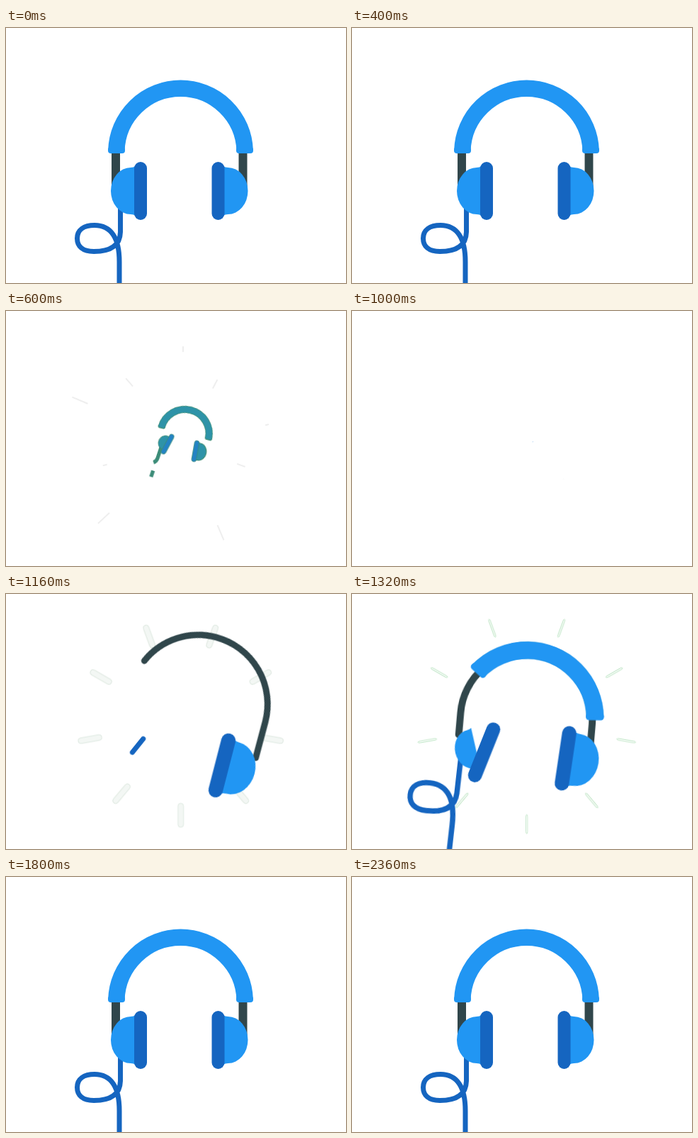
Animation of 480 by 360 pixels, one loop 2.4 s. Source, as an HTML page:

```html
<!DOCTYPE html>
<html lang="en">
<head>
<meta charset="utf-8">
<title>Headphones</title>
<style>
html, body { margin: 0; width: 100%; height: 100%; overflow: hidden; background: #fff; }
svg { display: block; width: 100vw; height: 100vh; }
svg * { animation-duration: 2.4s; animation-timing-function: linear; animation-iteration-count: infinite; }

.arch { transform-origin: 246.5px 176px; animation-name: arch; }
.right { transform-origin: 299.5px 230px; animation-name: right; }
.left { transform-origin: 190px 230px; animation-name: left; }
.left .cup { transform-origin: 180px 230px; animation-name: cup, tint; }
.wire { transform-origin: 162px 255px; animation-name: wire; }

.stem { fill: none; stroke: #30464b; stroke-width: 12; stroke-linecap: round; stroke-dasharray: 378 800; transform-origin: 246.5px 176px; animation-name: stem, sway; }
.band, .rim { fill: none; stroke: #2196f3; stroke-width: 23.5; stroke-dasharray: 180 400; }
.rim { stroke: #3c8c70; stroke-width: 22; animation-name: trim, rim; }
.band { animation-name: trim, bandTint; }
.cap { fill: #2196f3; stroke: #3c8c70; stroke-width: 0; transform-origin: 246.5px 176px; animation-name: tint, capShow; }
.cap.free { animation-name: tint, capShow, capTurn; }
.cup { fill: #2196f3; stroke: #3c8c70; stroke-width: 0; animation-name: tint; }
.pad { fill: #1565c0; stroke: #3c8c70; stroke-width: 0; animation-name: padTint; }
.cable { fill: none; stroke: #1565c0; stroke-width: 7; animation-name: cable; }
.ray { fill: #f3f7f4; stroke: #d5e2d8; stroke-width: .7; vector-effect: non-scaling-stroke; transform: scale(0); animation-name: ray; }
.spark { stroke: #8a8f8c; stroke-width: .5; opacity: 0; animation-name: spark; }

@keyframes arch {
  0%, 16.67% { transform: none; animation-timing-function: ease-in; }
  25% { transform: translate(6px, -3px) rotate(14deg) scale(.38); }
  30%, 41.6% { transform: translate(8px, 0) rotate(24deg) scale(0); }
  41.67% { transform: translate(12px, -8px) rotate(32deg) scale(.8); }
  48.33% { transform: translate(27px, -20px) rotate(15deg) scale(1.09); }
  55% { transform: translate(.5px, -.5px) rotate(1deg) scale(1.06); animation-timing-function: ease-out; }
  63.33%, 100% { transform: none; }
}
@keyframes right {
  0%, 16.67% { transform: none; animation-timing-function: ease-in; }
  25% { transform: translate(-32px, -32px) rotate(10deg) scale(.37); }
  30%, 41.67% { transform: translate(-45px, -46px) rotate(24deg) scale(0); animation-timing-function: ease-out; }
  48.33% { transform: translate(5.5px, 12px) rotate(14.5deg) scale(1.13); }
  55% { transform: translate(2px, 2px) rotate(8.5deg) scale(1.12); animation-timing-function: ease-out; }
  63.33%, 100% { transform: none; }
}
@keyframes left {
  0%, 16.67% { transform: none; animation-timing-function: ease-in; }
  25% { transform: translate(38px, -42px) rotate(28deg) scale(.38); }
  30% { transform: translate(55px, -55px) rotate(40deg) scale(0); }
  45% { transform: translate(6px, -24px) rotate(44deg) scale(0); }
  48.33% { transform: translate(-4px, -16px) rotate(39deg) scale(.38); }
  55% { transform: translate(-3.5px, -6.5px) rotate(22deg) scale(1.09); animation-timing-function: ease-out; }
  63.33%, 100% { transform: none; }
}
@keyframes cup {
  0%, 16.67% { transform: none; }
  25%, 30% { transform: scale(.8); }
  30.1%, 49.5% { transform: translate(-2px, 0) rotate(-60deg) scale(0); }
  55% { transform: translate(-4px, .5px) rotate(-35deg) scale(.77); animation-timing-function: ease-out; }
  61%, 100% { transform: none; }
}
@keyframes wire {
  0%, 16.67% { transform: none; animation-timing-function: ease-in; }
  25% { transform: translate(56px, -59px) rotate(18deg) scale(.38); }
  29%, 48.33% { transform: translate(70px, -75px) rotate(35deg) scale(0); }
  48.4% { transform: translate(-14px, -14px) rotate(16deg); }
  51.67% { transform: translate(-18px, -12px) rotate(11deg) scale(1.06); }
  55% { transform: translate(-9.5px, -9px) rotate(6.5deg) scale(1.07); animation-timing-function: ease-out; }
  63.33%, 100% { transform: none; }
}
@keyframes stem {
  0%, 16.67% { stroke-width: 12; stroke-dashoffset: 0; }
  23%, 41.6% { stroke-width: 0; stroke-dashoffset: 0; }
  41.67% { stroke-width: 0; stroke-dashoffset: 378; }
  48.33% { stroke-width: 8.2; stroke-dashoffset: 86; }
  55% { stroke-width: 9.5; stroke-dashoffset: 18; }
  60%, 100% { stroke-width: 12; stroke-dashoffset: 0; }
}
@keyframes sway {
  0%, 48.33% { transform: none; }
  55% { transform: translateX(1px) rotate(4deg) scale(.98); animation-timing-function: ease-out; }
  63.33%, 100% { transform: none; }
}
@keyframes trim {
  0%, 41.6% { stroke-dashoffset: 0; }
  41.67%, 48.7% { stroke-dashoffset: 180; }
  55% { stroke-dashoffset: 42; animation-timing-function: ease-out; }
  60%, 100% { stroke-dashoffset: 0; }
}
@keyframes capTurn {
  0%, 41.6% { transform: none; }
  41.67%, 48.7% { transform: rotate(180deg); }
  55% { transform: rotate(42deg); animation-timing-function: ease-out; }
  60%, 100% { transform: none; }
}
@keyframes capShow {
  0%, 41.6% { opacity: 1; }
  41.67%, 48.7% { opacity: 0; }
  48.8%, 100% { opacity: 1; }
}
@keyframes rim {
  0%, 18% { stroke-width: 22; }
  25%, 30% { stroke-width: 27; }
  30.1%, 100% { stroke-width: 22; }
}
@keyframes bandTint {
  0%, 18% { stroke: #2196f3; }
  25%, 30% { stroke: #2e93a8; }
  30.1%, 100% { stroke: #2196f3; }
}
@keyframes tint {
  0%, 18% { fill: #2196f3; stroke-width: 0; }
  25%, 30% { fill: #2e93a8; stroke-width: 3px; }
  30.1%, 100% { fill: #2196f3; stroke-width: 0; }
}
@keyframes padTint {
  0%, 18% { fill: #1565c0; stroke-width: 0; }
  25%, 30% { fill: #2483c4; stroke-width: 2px; }
  30.1%, 100% { fill: #1565c0; stroke-width: 0; }
}
@keyframes cable {
  0%, 18% { stroke: #1565c0; stroke-width: 7; stroke-dasharray: 100 300 0 300; }
  25%, 30% { stroke: #3c8c78; stroke-width: 14; stroke-dasharray: 24 56 8 300; }
  30.1%, 48.4% { stroke: #1565c0; stroke-width: 7; stroke-dasharray: 0 300 0 300; }
  53.5%, 100% { stroke: #1565c0; stroke-width: 7; stroke-dasharray: 100 300 0 300; }
}
@keyframes ray {
  0%, 42.5% { transform: translateY(50px) scale(0); }
  43.33% { transform: translateY(60px) scale(.8, .3); animation-timing-function: ease-out; }
  48.33% { transform: translateY(130px) scale(1); fill: #f3f7f4; stroke: #d5e2d8; }
  55% { transform: translateY(142.5px) scale(.3, .8); fill: #fff; stroke: #a9dcb2; }
  61%, 100% { transform: translateY(156px) scale(0); fill: #fff; stroke: #a9dcb2; }
}
@keyframes spark {
  0%, 20% { opacity: 0; transform: translateY(-40px); }
  25% { opacity: .6; transform: none; }
  30% { opacity: 0; transform: translateY(18px); }
  100% { opacity: 0; transform: translateY(18px); }
}
</style>
</head>
<body>
<svg viewBox="0 0 480 360">
  <g id="rays" transform="translate(246.7 182.3)"></g>
  <g id="sparks" transform="translate(250 188)"></g>

  <g class="wire">
    <path class="cable" pathLength="100" d="M161.5 236V288C161 308 146 315.5 124 315.5C108 315.5 100.5 308 100.5 297C100.5 285 110 278.5 125 278.5C148 278.5 160 296 160 330V400"/>
  </g>

  <g class="arch">
    <path class="stem" pathLength="378" d="M334.5 224V176A89.75 89.75 0 0 0 155 176V224"/>
    <path class="rim" pathLength="180" d="M337.15 173A90.7 90.7 0 0 0 155.85 173"/>
    <rect class="cap free" x="144" y="168" width="24" height="9" rx="4"/>
    <rect class="cap" x="325" y="168" width="24" height="9" rx="4"/>
    <path class="band" pathLength="180" d="M337.15 173A90.7 90.7 0 0 0 155.85 173"/>
  </g>

  <g class="left">
    <path class="cup" d="M183 195Q180 197 176 197A28 33 0 0 0 176 263Q180 263 183 265Z"/>
    <rect class="pad" x="181" y="189" width="18" height="82" rx="9"/>
  </g>

  <g class="right">
    <path class="cup" d="M306.5 195Q309.5 197 313.5 197A28 33 0 0 1 313.5 263Q309.5 263 306.5 265Z"/>
    <rect class="pad" x="290.5" y="189" width="18" height="82" rx="9"/>
  </g>
</svg>
<script>
const add = (parent, angle, shape) =>
  parent.insertAdjacentHTML('beforeend', `<g transform="rotate(${angle})">${shape}</g>`);

const rays = document.getElementById('rays');
for (let i = 0; i < 9; i++) {
  add(rays, i * 40, '<rect class="ray" x="-4" y="-17" width="8" height="34" rx="4"/>');
}

// Each spark: clockwise angle from straight down, inner radius, length.
const sparks = document.getElementById('sparks');
[[180, 130, 8], [139, 108, 15], [113, 146, 24], [75, 111, 6], [47, 142, 22],
 [-23, 124, 23], [-70, 81, 12], [-103, 119, 5], [-152, 89, 14]].forEach(([angle, radius, length]) =>
  add(sparks, angle, `<line class="spark" y1="${radius}" y2="${radius + length}"/>`));
</script>
</body>
</html>
```
